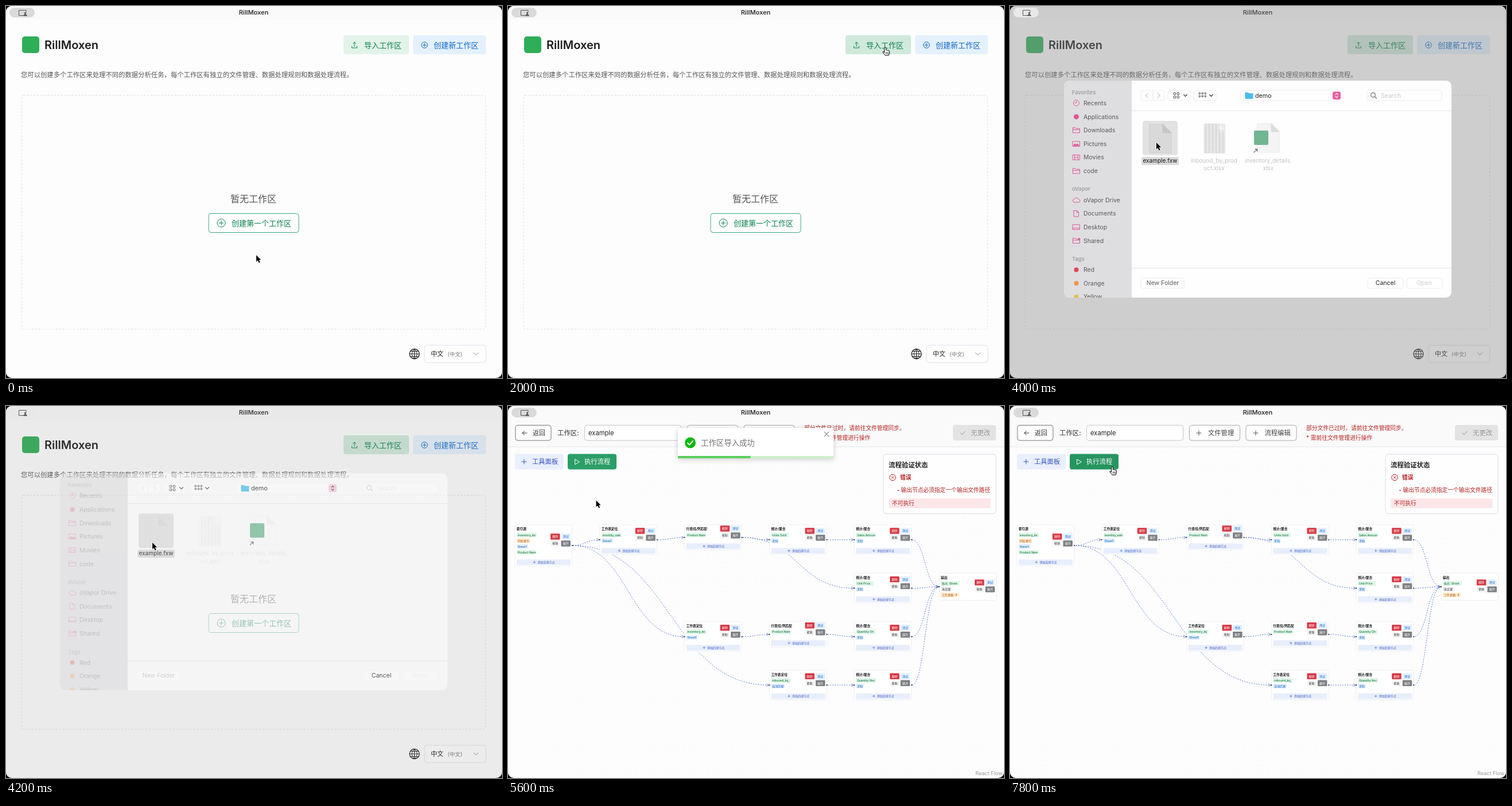
An HTML page that plays this animation: 864x648 px, repeating every 8 s.

```html
<!DOCTYPE html>
<html lang="zh-CN">
<head>
<meta charset="utf-8">
<style>
html, body { margin: 0; width: 100%; height: 100%; overflow: hidden; background: #000; }
svg { display: block; width: 864px; height: 648px; }
text { font-family: Inter, 'Noto Sans CJK SC', 'Noto Sans CJK', sans-serif; white-space: pre; }
</style>
</head>
<body>
<svg id="stage" xmlns="http://www.w3.org/2000/svg" viewBox="0 0 864 648"></svg>
<script>
const LOOP = 8000, STEP = 200;
const APP = 'RillMoxen', CLOUD = 'oVapor';
const GREEN = '#0a8050', BLUE = '#1068c8', RED = '#b3201f', PINK = '#e8267f', INDIGO = '#3454be';

// Drawing helpers
const text = (x, y, s, size, fill = '#333', weight = 400, anchor = 'start') =>
  `<text x="${x}" y="${y}" font-size="${size}" fill="${fill}" font-weight="${weight}" text-anchor="${anchor}">${s}</text>`;
const box = (x, y, w, h, fill = 'none', r = 0, stroke = 'none', extra = '') =>
  `<rect x="${x}" y="${y}" width="${w}" height="${h}" rx="${r}" fill="${fill}" stroke="${stroke}" ${extra}/>`;
const line = (d, stroke = '#333', width = 1, fill = 'none', extra = '') =>
  `<path d="${d}" fill="${fill}" stroke="${stroke}" stroke-width="${width}" stroke-linecap="round" stroke-linejoin="round" ${extra}/>`;
const circle = (x, y, r, fill = 'none', stroke = 'none', width = 1) =>
  `<circle cx="${x}" cy="${y}" r="${r}" fill="${fill}" stroke="${stroke}" stroke-width="${width}"/>`;
const group = (id, body, extra = '') => `<g id="${id}" ${extra}>${body}</g>`;
const plus = (x, y, r, color, width = 1) => line(`M${x - r} ${y}h${2 * r}M${x} ${y - r}v${2 * r}`, color, width);
const plusCircle = (x, y, r, color) => circle(x, y, r, 'none', color) + plus(x, y, r * .55, color);
const cross = (x, y, r, color, width = 1) =>
  line(`M${x - r} ${y - r}l${2 * r} ${2 * r}M${x + r} ${y - r}l${-2 * r} ${2 * r}`, color, width);
const chevron = (x, y, r, color, width = 1.2) => line(`M${x - r} ${y - r / 2}l${r} ${r}l${r} ${-r}`, color, width);

function homePage() {
  return box(0, 0, 864, 648, '#fdfdfd') + box(0, 0, 864, 24, '#fafafa') +
    box(28, 53, 30, 29, '#2fae58', 5) +
    text(67, 75, APP, 20, '#1d1d1f', 600) +
    box(588, 51, 114, 33, '#e2f3e9', 4, 'none', 'id="importButton"') +
    line('M602.5 70v3h9v-3M607 70.5v-7.5M604.5 65.5l2.5-2.5l2.5 2.5', GREEN) +
    text(624, 73, '导入工作区', 13, GREEN, 500) +
    box(709, 51, 127, 33, '#e4f1fd', 4) + plusCircle(729, 68, 5.3, BLUE) +
    text(745, 73, '创建新工作区', 13, BLUE, 500) +
    text(26, 124, '您可以创建多个工作区来处理不同的数据分析任务，每个工作区有独立的文件管理、数据处理规则和数据处理流程。', 11.35, '#555') +
    box(27, 155.5, 808.5, 407.5, 'none', 3, '#dcdcee', 'stroke-dasharray="3 3"') +
    text(431, 342, '暂无工作区', 16, '#555', 400, 'middle') +
    box(353, 361.5, 157, 33, '#fefefe', 4, '#45a881') + plusCircle(375, 378, 7, GREEN) +
    text(393, 383, '创建第一个工作区', 13, GREEN, 500) +
    circle(711.5, 606, 8.5, 'none', '#222', 1.3) +
    line('M703 606h17M711.5 597.5v17M704.5 601.5h14M704.5 610.5h14M711.5 597.5c-6 5-6 12 0 17c6-5 6-12 0-17', '#222') +
    box(729, 591, 107, 30, '#fefefe', 4, '#e0e0ee') +
    text(740, 610, '中文', 11, '#222', 500) + text(769, 609.5, '(中文)', 9.5, '#777') +
    chevron(818.5, 606, 4, '#888', 1);
}

const folder = (x, y) => line(`M${x - 6} ${y + 4}v-8.5h4l1.5 1.5h6.5v7zM${x - 6} ${y - 1}h12`, PINK);
const sheet = (x, y) => line(`M${x - 4} ${y - 5}h5l3 3v7.5h-8zM${x + 1} ${y - 5}v3h3`, PINK);
const screen = (x, y, inner) => line(`M${x - 6} ${y - 4}h12v8.5h-12z${inner}`, PINK);
const sidebarItems = [
  ['Recents', 174, (x, y) => circle(x, y, 5, 'none', PINK) + line(`M${x} ${y - 3}v3h-2.5`, PINK)],
  ['Applications', 198, (x, y) => circle(x, y, 4.5, PINK)],
  ['Downloads', 221.5, folder],
  ['Pictures', 245, (x, y) => screen(x, y, '') + line(`M${x - 5} ${y + 3}l3-3l2 2l2-2l3 3z`, PINK, 1, PINK)],
  ['Movies', 268.5, (x, y) => screen(x, y, 'm3 0v8.5m6-8.5v8.5m-6-4h6')],
  ['code', 292.5, folder],
  [CLOUD + ' Drive', 343, (x, y) => line(`M${x - 3} ${y + 4}h7a2.5 2.5 0 0 0 0-5a4 4 0 0 0-7.5-.5a2.4 2.4 0 0 0 .5 5.5`, PINK)],
  ['Documents', 366.5, sheet],
  ['Desktop', 390, (x, y) => screen(x, y, 'm0 6h12')],
  ['Shared', 414, (x, y) => folder(x, y) + circle(x + 5, y - 3, 2, PINK)],
  ['Red', 464.5, (x, y) => circle(x, y, 4, '#e0101d')],
  ['Orange', 488, (x, y) => circle(x, y, 4, '#f07d12')],
  ['Yellow', 511.5, (x, y) => circle(x, y, 4, '#eab510')],
];

const pageIcon = (x, y, w, h, fold) =>
  line(`M${x} ${y}h${w - fold}l${fold} ${fold}v${h - fold}h${-w}z`, '#d9d9d9', .7, '#f1f1f1') +
  line(`M${x + w - fold} ${y}v${fold}h${fold}z`, '#c4c4c4', .7, '#d3d3d3');

function filePanel() {
  const control = (x, w, y = 152, h = 18) => box(x, y, w, h, '#fff', 4, '#e5e5e5');
  const grid = (x, cols, rows, size, gap) => Array.from({ length: cols * rows }, (_, i) =>
    box(x + i % cols * gap, 156 + Math.floor(i / cols) * gap, size, size, 'none', .5, '#444')).join('');
  const fileName = (x, rows) => rows.map((s, i) => text(x, 278 + i * 13.5, s, 10, '#aeaeae', 400, 'middle')).join('');
  const headings = [['Favorites', 159], [CLOUD, 327.5], ['Tags', 449.5]];
  let thumbnail = box(337.5, 210, 37.5, 52, '#e6e6e6');
  for (let i = 0; i < 17; i++) thumbnail += line(`M338 ${212 + i * 3}h${i < 5 ? 26 : 37}`, '#bcbcbc', .6);
  for (let i = 0; i < 6; i++) thumbnail += line(`M${341 + i * 6} ${i > 3 ? 222 : 210}v${i > 3 ? 39 : 51}`, '#b4b4b4', .9);
  thumbnail += line('M364 210v11h11z', '#ccc', .6, '#f0f0f0');

  const backdrop = box(94, 135, 675, 378, '#fefefe', 10) +
    box(94, 135, 118, 378, '#dedee0', 0, 'none', 'clip-path="url(#panelClip)"') +
    line('M212 187.5h557M212 462h557', '#e0e0ea');
  const content = headings.map(([s, y]) => text(108, y, s, 9.3, '#8a8a8a', 600)).join('') +
    sidebarItems.map(([s, y, icon]) => icon(115.5, y) + text(128, y + 4, s, 10.5, '#2b2b2b')).join('') +
    control(228, 20) + control(249, 20) + control(275, 39) + control(320, 39) +
    line('M240 157l-4 4l4 4M257 157l4 4l-4 4', '#aaa', 1.2) +
    control(402, 175) + control(622, 130) +
    circle(632.5, 160, 3.8, 'none', '#333', 1.2) + line('M635.5 163l3 3', '#333', 1.3) +
    text(646, 165, 'Search', 10.5, '#b5b5b5') +
    box(562, 154, 14, 14, PINK, 3.5) +
    pageIcon(243, 211, 38, 50, 15) + thumbnail + pageIcon(431, 210, 38, 50, 14) +
    fileName(355.5, ['inbound_by_prod', 'uct.xlsx']) + fileName(450, ['inventory_details.', 'xlsx']) +
    control(228, 76, 479) + text(266, 491, 'New Folder', 10.5, '#222', 400, 'middle') +
    control(623, 62, 479) + control(691, 62, 479) + text(721.5, 491, 'Open', 10.5, '#bbb', 400, 'middle');
  const firm = grid(285, 2, 2, 3.5, 6) + grid(329, 3, 2, 2.5, 5) +
    chevron(305.5, 161, 2.8, '#333') + chevron(350.5, 161, 2.8, '#333') +
    line('M410 156h5l1 1.5h7v9h-13z', '#35a7dc', .5, '#48bdeb') + text(427, 165, 'demo', 10.7, '#222') +
    line('M567 159.5l2-2.5l2 2.5M567 162.5l2 2.5l2-2.5', '#fff', 1.2, 'none', 'id="stepper"') +
    box(425, 222, 25, 25, '#72b592', 2) + line('M425 260l5-5M427 254.5h3.5v3.5', '#666', 1.3) +
    group('selection', box(231, 205, 61, 60, '#0000001c', 4) + box(229, 268, 65, 14, '#00000024', 3)) +
    text(261.5, 278, 'example.fxw', 10, '#111', 400, 'middle') +
    text(654, 491, 'Cancel', 10.5, '#222', 400, 'middle');
  return group('backdrop', backdrop) +
    `<g clip-path="url(#panelClip)">${group('content', content)}</g>` + group('firm', firm);
}

const TAGS = { g: ['#e0f6e9', '#13783f'], b: ['#e1effd', '#1767c2'], o: ['#fdecd0', '#b35309'], n: ['#eee', '#444'] };
const LOCATE = '工作表定位', MATCH = '行查找/列匹配', STATS = '统计/聚合';
const nodes = [
  [0, 0, '索引源', 'g:inventory_de', 'o:列名索引', 'b:Sheet1', 'g:Product Nam'],
  [1, 0, LOCATE, 'g:monthly_sale', 'b:Sheet1'],
  [2, 0, MATCH, 'g:Product Nam'],
  [3, 0, STATS, 'g:Units Sold', 'b:求和'],
  [4, 0, STATS, 'g:Sales Amoun', 'b:求和'],
  [4, 1, STATS, 'g:Unit Price', 'b:求和'],
  [5, 1, '输出', 'g:格式: Sheet', 'n:未设置', 'o:工作表数: 4'],
  [2, 2, LOCATE, 'g:inventory_de', 'b:Sheet1'],
  [3, 2, MATCH, 'g:Product Nam'],
  [4, 2, STATS, 'g:Quantity On', 'b:求和'],
  [3, 3, LOCATE, 'g:inbound_by_', 'b:自动匹配'],
  [4, 3, STATS, 'g:Quantity Rec', 'b:求和'],
].map(([col, row, title, ...tags]) => {
  const last = col === 5, bar = tags.length === 1 ? 37 : 25 + 10 * tags.length;
  return { x: 12 + col * 147.8, y: 207 + row * 84.4, title, tags, last, bar, h: last ? 47 : bar + 7 };
});
const edges = [[0, 1], [1, 2], [2, 3], [3, 4], [2, 5], [0, 7], [0, 10], [7, 8], [8, 9], [10, 11], [4, 6], [5, 6], [9, 6], [11, 6]];

function drawNode({ x, y, title, tags, last, bar, h }) {
  const by = y + (last ? h / 2 - 7.5 : bar / 2 - 12);
  const button = (dx, cy, s, fill, color) =>
    box(x + dx, cy - 5.2, 16.5, 10.4, fill, 1.2) + text(x + dx + 8.2, cy + 1.9, s, 5, color, 500, 'middle');
  return box(x, y, 99.5, h, '#fff', 2, '#ececf2', 'stroke-width=".8"') +
    text(x + 3, y + 9.3, title, 5.7, '#111', 700) +
    tags.map((tag, i) => {
      const [fill, color] = TAGS[tag[0]], s = tag.slice(2), cy = y + 17.6 + 10 * i;
      const wide = [...s].reduce((w, c) => w + (c > '\u2e80' ? 5 : 2.8), 3);
      return box(x + 3, cy - 4, Math.min(wide, 35), 8, fill, 1) + text(x + 4.7, cy + 1.9, s, 5.1, color, 500);
    }).join('') +
    button(62, by, '删除', '#d83a46', '#fff') + button(80.5, by, '测试', '#e3f0fd', BLUE) +
    button(62, by + 12, '帮助', '#f4f4f4', '#333') + button(80.5, by + 12, '展开', '#7d8084', '#fff') +
    (last ? '' : box(x + 3, y + bar - 4.8, 94, 10, '#e8eefc', 1) + plus(x + 34, y + bar + .2, 2, INDIGO, .6) +
      text(x + 39.5, y + bar + 2.1, '添加后续节点', 5, INDIGO, 500) + circle(x + 100, y + h / 2, 1.1, '#333')) +
    (x > 12 ? circle(x, y + h / 2, 1.1, '#333') : '');
}

function drawEdge([from, to]) {
  const a = nodes[from], b = nodes[to];
  const x1 = a.x + 100, y1 = a.y + a.h / 2, x2 = b.x - 1, y2 = b.y + b.h / 2, mid = (x1 + x2) / 2;
  return line(`M${x1} ${y1}C${mid} ${y1} ${mid} ${y2} ${x2} ${y2}`, '#5573cc', .9, 'none',
    'class="edge" style="stroke-linecap:butt" stroke-dasharray="2.1 2.1"') +
    line(`M${x2 - 4} ${y2 - 2}l4 2l-4 2`, '#5573cc', .8);
}

function flowPage() {
  const outlined = (x, w, s, tx) => box(x, 33.5, w, 26.5, '#fefefe', 4, '#aaa') + text(tx, 51, s, 11.3, '#444', 500);
  return box(0, 0, 864, 648, '#fdfdfd') + box(0, 71, 864, 577, 'url(#dots)') +
    box(0, 0, 864, 71, '#fafafa') + line('M0 71h864', '#e6e6ec') +
    box(13, 33.5, 62, 26.5, '#fefefe', 4, '#777') + line('M33 47h-8M28.5 43.5l-3.5 3.5l3.5 3.5', '#333') +
    text(43, 51, '返回', 11, '#333', 500) + text(86, 51, '工作区:', 11.4, '#333', 500) +
    box(133.5, 33.5, 168, 26.5, '#fff', 4, '#c6c6c6') + text(140, 51.3, 'example', 11.2, '#222') +
    outlined(312.5, 88, '文件管理', 345) + plus(329, 47, 4, '#555') +
    outlined(411, 88, '流程编辑', 443.5) + plus(428, 47, 4, '#555') +
    text(516, 42, '部分文件已过时，请前往文件管理同步。', 9.75, RED) + text(516, 58.5, '* 需前往文件管理进行操作', 9.75, RED) +
    box(775, 33, 75, 27, '#e3e3e4', 4) + line('M788 47l3 3l5-6', '#999') + text(806, 51, '无更改', 11.4, '#999', 500) +
    edges.map(drawEdge).join('') + nodes.map(drawNode).join('') +
    box(12, 83.5, 85, 27, '#e9effd', 4, 'none', 'id="toolsButton"') + plus(28, 97, 4, INDIGO) + text(42, 101.3, '工具面板', 11.3, INDIGO, 500) +
    box(104, 83.5, 85, 27, '#2b9e67', 4, 'none', 'id="runButton"') + line('M117 93l7.5 4.3l-7.5 4.3z', '#fff') +
    text(133, 101.3, '执行流程', 11.3, '#fff', 500) +
    box(654, 84, 196, 103.5, '#fefefe', 5, '#dedeea') + text(663, 107, '流程验证状态', 11.4, '#222', 600) +
    circle(670, 124.5, 5.3, 'none', RED) + cross(670, 124.5, 2, RED) + text(683, 128, '错误', 9.7, RED, 600) +
    circle(679.5, 147, 1.1, RED) + text(684.5, 149.5, '输出节点必须指定一个输出文件路径', 9.72, RED) +
    box(663.5, 161, 177, 17, '#fce6e9', 2) + text(669, 173, '不可执行', 9.7, RED, 500) +
    text(861, 643, 'React Flow', 9, '#999', 400, 'end');
}

const toast = box(296, 38, 271, 53, '#fff', 2, 'none', 'style="filter:drop-shadow(0 2px 5px #0003)"') +
  circle(317.5, 64, 9.5, '#07b80c') + line('M313 64.5l3 3l6-6.5', '#fff', 2) +
  text(336, 68.5, '工作区导入成功', 13.4, '#757575') + cross(555, 49, 3.8, '#888', 1.2) +
  box(296, 87, 271, 4, '#cdf1ce') + box(296, 87, 271, 4, '#5acf5c', 0, 'none', 'id="progress"');

const cursor =
  group('arrow', line('M0 0v11.5l2.6-2.4l2 4.3l2-.9l-2-4.2h3.6z', '#fff', 1, '#000', 'style="paint-order:stroke"')) +
  group('hand', line('M-1.4 9V1.2a1.4 1.4 0 0 1 2.8 0V5q1.2-1 2.2.3q1.3-.8 2.1.5q1.7-.4 1.7 1.2v3q-.4 2-1.4 4h-6q-2-3-4.3-5.5q0-1.6 2-.8z', '#000', 1, '#fff') +
    line('M1.5 8.5v3M3.4 8.5v3M5.2 8.5v3', '#000', .7));

const stage = document.getElementById('stage');
stage.innerHTML = `<defs>
  <clipPath id="windowClip">${box(0, 0, 864, 648, '#000', 10)}</clipPath>
  <clipPath id="panelClip">${box(94, 135, 675, 378, '#000', 10)}</clipPath>
  <pattern id="dots" width="8.4" height="8.4" patternUnits="userSpaceOnUse">${circle(4, 4, .4, '#dcdcdc')}</pattern></defs>` +
  `<g clip-path="url(#windowClip)">` + group('home', homePage()) + group('flow', flowPage()) +
  text(431.5, 15, APP, 11, '#333', 600, 'middle') + box(0, 0, 864, 648, '#888', 0, 'none', 'id="dim"') +
  box(6, 3, 44, 17, '#dadada', 8.5, 'none', 'id="pill"') + line('M31 16.5h-8.5v-9h12.5v3', '#555') +
  circle(33.5, 12.3, 1.5, '#444') + line('M30.5 16.5q3-4 6 0z', '#444', 1, '#444') +
  group('panel', filePanel()) + group('toast', toast) + group('cursor', cursor) + '</g>';

const part = Object.fromEntries([...stage.querySelectorAll('[id]')].map(el => [el.id, el]));
const dashes = stage.querySelectorAll('.edge');
const set = (id, name, value) => part[id].setAttribute(name, value);
const show = (id, visible) => { part[id].style.display = visible ? '' : 'none'; };
const clamp = v => Math.max(0, Math.min(1, v));

const cursorKeys = [[0, 436, 434], [400, 436, 434], [1400, 657, 72], [2000, 657, 72], [3000, 249, 242],
  [3300, 249, 242], [3600, 255, 238], [4900, 255, 238], [6200, 73, 106], [6600, 73, 106], [7600, 178, 106], [LOOP, 178, 106]];

// Interpolates [time, ...values] keys, optionally easing each span.
function sample(keys, t, ease = k => k) {
  const i = Math.max(1, keys.findIndex(key => key[0] >= t));
  const a = keys[i - 1], b = keys[i], k = ease(clamp((t - a[0]) / (b[0] - a[0])));
  return a.slice(1).map((v, j) => v + (b[j + 1] - v) * k);
}

function render(t) {
  const isFlow = t >= 4600;
  const open = clamp((t - 2000) / 400) * clamp(1 - (t - 3920) / 400);
  const [x, y] = sample(cursorKeys, t, k => k * k * (3 - 2 * k));
  const over = (left, top, w, h) => x >= left && x <= left + w && y >= top && y <= top + h;
  const overImport = !isFlow && !open && over(588, 51, 114, 33);
  const overTools = isFlow && over(12, 83, 85, 27), overRun = isFlow && over(104, 83, 85, 27);
  const pointing = overImport || overTools || overRun;

  show('home', !isFlow);
  show('flow', isFlow);
  set('importButton', 'fill', overImport || t >= 2000 ? '#cfe9db' : '#e2f3e9');
  set('toolsButton', 'fill', overTools ? '#dbe5fc' : '#e9effd');
  set('runButton', 'fill', overRun ? '#279560' : '#2b9e67');

  set('dim', 'opacity', open * .5);
  set('pill', 'fill', open > .1 ? '#e8e8e8' : '#dadada');
  show('panel', open > 0);
  set('panel', 'transform', `translate(0 ${-25.5 * (1 - open)})`);
  set('backdrop', 'opacity', clamp(open * 1.8));
  set('content', 'opacity', open ** 1.4);
  set('firm', 'opacity', clamp(open * 2.5));
  set('stepper', 'stroke', open < .5 ? '#555' : '#fff');
  show('selection', t >= 3600);

  const [lift] = sample([[0, 0], [6400, 0], [6540, -10], [6680, 20], [6715, 20], [7100, -2000], [LOOP, -2000]], t);
  show('toast', t >= 4800 && lift > -150);
  set('toast', 'transform', `translate(0 ${lift})`);
  set('progress', 'width', 271 * clamp(1 - (t - 4800) / 1500));
  dashes.forEach(el => el.setAttribute('stroke-dashoffset', 4.2 * (1 - t % 500 / 500)));

  set('cursor', 'transform', `translate(${x} ${y})`);
  show('hand', pointing);
  show('arrow', !pointing);
}

function tick() {
  const t = performance.now() % LOOP;
  render(Math.floor(t / STEP) * STEP);
  requestAnimationFrame(tick);
}
tick();
</script>
</body>
</html>
```
